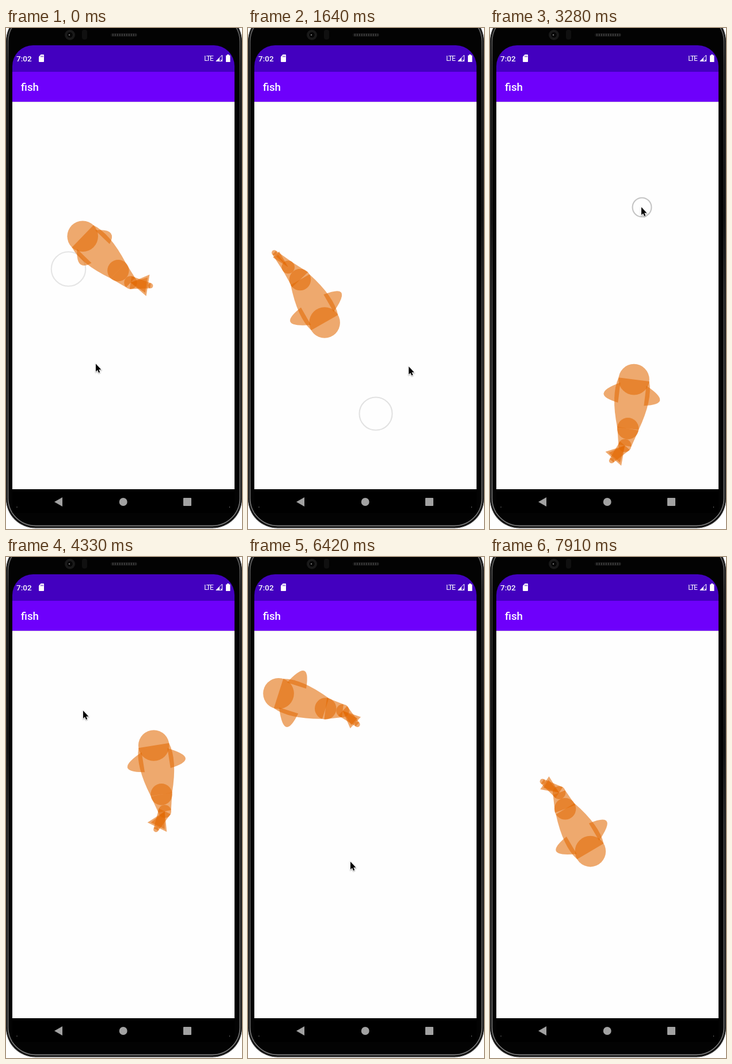
An HTML page with a canvas that plays this animation: 410x869 px, repeating every 8000 ms.

```html
<!DOCTYPE html>
<html lang="en">
<head>
<meta charset="utf-8">
<title>fish</title>
<style>
  html, body { margin: 0; width: 100%; height: 100%; overflow: hidden; background: #fff; }
  svg, canvas { position: absolute; left: 0; top: 0; width: 410px; height: 869px; display: block; }
  text { font-family: Roboto, sans-serif; fill: #fff; }
</style>
</head>
<body>
<svg viewBox="0 0 410 869">
  <defs>
    <linearGradient id="rim" x1="0" y1="0" x2="0" y2="1">
      <stop offset="0" stop-color="#777"/>
      <stop offset=".1" stop-color="#3c3c3c"/>
      <stop offset=".4" stop-color="#1c1c1c"/>
      <stop offset=".55" stop-color="#4a4a4a"/>
      <stop offset="1" stop-color="#777"/>
    </linearGradient>
  </defs>
  <!-- phone body -->
  <rect y="-28" width="410" height="895.5" rx="51" fill="#030303"/>
  <rect x=".7" y="-27.3" width="408.6" height="894" rx="50.5" fill="none" stroke="#444"/>
  <rect x="3.5" y="-24.5" width="403" height="888" rx="48" fill="none" stroke="url(#rim)" stroke-width="1.8"/>
  <circle cx="111" cy="12" r="9" fill="#191919"/>
  <circle cx="111" cy="12" r="5.5" fill="#070707" stroke="#222"/>
  <circle cx="110" cy="12" r="1.2" fill="#777"/>
  <rect x="132" y="3" width="9" height="17" rx="4" fill="#101010"/>
  <rect x="182" y="9" width="46" height="6" rx="3" fill="#141414"/>
  <path d="M185 12H226" stroke="#444" stroke-width="4" stroke-dasharray="1.5 2.5"/>
  <!-- screen -->
  <path d="M11 76V66A36 36 0 0 1 47 30H361A36 36 0 0 1 397 66V76Z" fill="#4300bf"/>
  <rect x="11" y="76" width="386" height="52" fill="#6e00fb"/>
  <rect x="11" y="128" width="386" height="672" fill="#fefefe"/>
  <path d="M11 128.4H397" stroke="#ddd" stroke-width=".8"/>
  <rect x="11" y="800" width="386" height="41" fill="#000"/>
  <text x="18" y="57.5" font-size="13.5" font-weight="500">7:02</text>
  <text x="344.3" y="57" font-size="12" letter-spacing="-1.1">LTE</text>
  <text x="26" y="109" font-size="18.7" font-weight="500">fish</text>
  <path d="M60.5 46H65Q66 46 66 47V58Q66 59 65 59H58Q57 59 57 58V50Z" fill="#fff"/>
  <path d="M60.7 48v2.5M62.5 48v2.5M64.3 48v2.5" stroke="#4300bf" stroke-width=".8"/>
  <path d="M365 57.5L375.5 47V57.5Z" fill="none" stroke="#fff"/>
  <path d="M364.5 58L371 51.5V58Z" fill="#fff"/>
  <path d="M372.5 54.5l3.5 3.5m0-3.5l-3.5 3.5" stroke="#fff"/>
  <path d="M384 46h3.5v1.5H389.5V59H382V47.5H384Z" fill="#fff"/>
  <g fill="#a2a2a2">
    <path d="M84 822L98 814V830Z"/>
    <circle cx="203.7" cy="822" r="7"/>
    <rect x="308" y="815" width="14" height="14" rx="1"/>
  </g>
  <path d="M18.5 831h1M388 831h1" stroke="#ccc"/>
</svg>
<canvas id="stage" width="410" height="869"></canvas>
<script>
const LOOP = 8000, FRAME = 149.25, SWIM = 2000, RIPPLE = 1000, FLAP = 500;
const HEAD = 26.8, BODY = HEAD * 3.2, FIN = HEAD * 1.3;
const BIG = HEAD * 0.7, MIDDLE = BIG * 0.6, SMALL = MIDDLE * 0.4;
const ORANGE = 'rgba(226,104,0,.57)';
const START = { x: 169, y: 412.5, angle: 90 };
const TOUCHES = [
  { t: -660, x: 108.5, y: 418, flaps: 2 },
  { t: 1002, x: 222, y: 669, flaps: 1 },
  { t: 2838, x: 264, y: 311, flaps: 1 },
  { t: 4690, x: 85, y: 248, flaps: 1 },
  { t: 6480, x: 178, y: 528, flaps: 1 }
];
// time, x, y of the pointer tip
const POINTER = [
  [0, 156, 582.5], [300, 170, 605], [890, 221, 671], [1340, 222, 672],
  [1790, 308, 545], [2240, 266, 420.5], [2690, 263, 312], [3580, 263, 310],
  [4330, 134, 266.5], [4480, 84, 260], [4630, 85, 248], [5300, 86, 250],
  [6270, 176, 526], [6420, 178, 528.5], [6720, 178, 528], [7300, 160, 585], [7600, 120, 585]
];

const ctx = document.getElementById('stage').getContext('2d');
const rad = deg => deg * Math.PI / 180;
const sin = deg => Math.sin(rad(deg));
const cos = deg => Math.cos(rad(deg));
const ease = k => (1 - Math.cos(Math.PI * k)) / 2;
const angleOf = (dx, dy) => Math.atan2(-dy, dx) * 180 / Math.PI;
const polar = (p, length, deg) => ({ x: p.x + cos(deg) * length, y: p.y - sin(deg) * length });

function cubic(p, u) {
  const v = 1 - u;
  const mix = k => v * v * v * p[0][k] + 3 * v * v * u * p[1][k] + 3 * v * u * u * p[2][k] + u * u * u * p[3][k];
  const slope = k => v * v * (p[1][k] - p[0][k]) + 2 * v * u * (p[2][k] - p[1][k]) + u * u * (p[3][k] - p[2][k]);
  return { x: mix('x'), y: mix('y'), angle: angleOf(slope('x'), slope('y')) };
}

function makeSwim(from, heading, to) {
  const turn = ((angleOf(to.x - from.x, to.y - from.y) - heading) % 360 + 540) % 360 - 180;
  const points = [from, polar(from, BODY / 2, heading), polar(from, HEAD * 1.6, heading + turn / 2), to];
  const lengths = [0], steps = 200;
  let last = from;
  for (let i = 1; i <= steps; i++) {
    const p = cubic(points, i / steps);
    lengths.push(lengths[i - 1] + Math.hypot(p.x - last.x, p.y - last.y));
    last = p;
  }
  return fraction => {
    const goal = fraction * lengths[steps];
    let i = 1;
    while (i < steps && lengths[i] < goal) i++;
    const part = (goal - lengths[i - 1]) / (lengths[i] - lengths[i - 1]);
    return cubic(points, (i - 1 + part) / steps);
  };
}

// Tail phase; it runs three times faster until the preceding swim is over.
function phaseAt(t, index) {
  const fast = index === 0 || t < TOUCHES[index - 1].t + SWIM;
  return (1230 + 0.362 * t) * (fast ? 3 : 1);
}

function poseAt(t, index) {
  const touch = TOUCHES[index], age = t - touch.t;
  const place = touch.swim(ease(Math.min(1, age / SWIM)));
  const phase = phaseAt(t, index);
  const flap = age < FLAP * touch.flaps ? ease(age % FLAP / FLAP) : 0;
  return { x: place.x, y: place.y, angle: place.angle + sin(phase * 0.8) * 10, phase, flap: 1 - Math.abs(2 * flap - 1) };
}

TOUCHES.forEach((touch, i) => {
  const from = i ? poseAt(touch.t, i - 1) : START;
  touch.swim = makeSwim(from, from.angle, touch);
});

function disc(p, r) {
  ctx.beginPath();
  ctx.arc(p.x, p.y, r, 0, Math.PI * 2);
  ctx.fill();
}

function polygon(...points) {
  ctx.beginPath();
  points.forEach(p => ctx.lineTo(p.x, p.y));
  ctx.closePath();
  ctx.fill();
}

function drawFin(head, angle, side, flap) {
  const root = polar(head, HEAD * 0.9, angle + side * 110);
  const end = polar(root, FIN, angle + 180);
  const reach = FIN * 1.8;
  const back = polar(root, reach * cos(65), angle + 180);
  const control = polar(back, reach * sin(65) * (1 - flap), angle + side * 90);
  ctx.beginPath();
  ctx.moveTo(root.x, root.y);
  ctx.quadraticCurveTo(control.x, control.y, end.x, end.y);
  ctx.fill();
}

function drawSegment(from, r1, r2, length, angle) {
  const to = polar(from, length, angle + 180);
  disc(to, r2);
  polygon(polar(to, r2, angle + 90), polar(to, r2, angle - 90), polar(from, r1, angle - 90), polar(from, r1, angle + 90));
  return to;
}

function drawTriangle(from, length, edge, angle) {
  const base = polar(from, length, angle + 180);
  polygon(from, polar(base, edge, angle + 90), polar(base, edge, angle - 90));
}

function drawBody(head, rear, angle) {
  const left = polar(head, HEAD, angle + 90), right = polar(head, HEAD, angle - 90);
  const rearLeft = polar(rear, BIG, angle + 90), rearRight = polar(rear, BIG, angle - 90);
  const bendLeft = polar(head, BODY * 0.56, angle + 130), bendRight = polar(head, BODY * 0.56, angle - 130);
  ctx.beginPath();
  ctx.moveTo(left.x, left.y);
  ctx.quadraticCurveTo(bendLeft.x, bendLeft.y, rearLeft.x, rearLeft.y);
  ctx.lineTo(rearRight.x, rearRight.y);
  ctx.quadraticCurveTo(bendRight.x, bendRight.y, right.x, right.y);
  ctx.fill();
}

function drawFish({ x, y, angle, phase, flap }) {
  ctx.fillStyle = ORANGE;
  const head = polar({ x, y }, BODY / 2, angle);
  const rear = polar(head, BODY, angle + 180);
  disc(head, HEAD);
  drawFin(head, angle, -1, flap);
  drawFin(head, angle, 1, flap);
  disc(rear, BIG);
  const joint = drawSegment(rear, BIG, MIDDLE, BIG * 1.6, angle + cos(phase) * 15);
  const tailAngle = angle + sin(phase) * 35;
  drawSegment(joint, MIDDLE, SMALL, MIDDLE * 3.1, tailAngle);
  const edge = Math.abs(sin(phase)) * BIG;
  drawTriangle(joint, MIDDLE * 2.7, edge, tailAngle);
  drawTriangle(joint, MIDDLE * 2.7 - HEAD * 0.1, edge - HEAD * 0.2, tailAngle);
  drawBody(head, rear, angle);
}

function drawRipple(touch, t) {
  const age = (t - touch.t) / RIPPLE;
  if (age < 0 || age >= 1) return;
  const k = ease(age);
  ctx.strokeStyle = `rgba(0,0,0,${0.392 * (1 - k)})`;
  ctx.lineWidth = 2.1;
  ctx.beginPath();
  ctx.arc(touch.x, touch.y, 40.2 * k, 0, Math.PI * 2);
  ctx.stroke();
}

function drawPointer(t) {
  const next = POINTER.findIndex(p => p[0] > t);
  if (next < 0) return;
  const a = POINTER[next - 1], b = POINTER[next], k = (t - a[0]) / (b[0] - a[0]);
  ctx.save();
  ctx.translate(a[1] + (b[1] - a[1]) * k, a[2] + (b[2] - a[2]) * k);
  const arrow = new Path2D('M0 0V13.5L3 10.8L5.1 15.5L7.2 14.5L5.2 10H9.4Z');
  ctx.shadowColor = 'rgba(0,0,0,.4)';
  ctx.shadowBlur = 2;
  ctx.shadowOffsetY = 1;
  ctx.strokeStyle = '#fff';
  ctx.lineWidth = 1.6;
  ctx.stroke(arrow);
  ctx.shadowColor = 'transparent';
  ctx.fillStyle = '#000';
  ctx.fill(arrow);
  ctx.restore();
}

const frameStart = n => Math.round(n * FRAME / 10) * 10;
function hold(t) {
  let n = Math.floor(t / FRAME) + 1;
  while (frameStart(n) > t) n--;
  return frameStart(n);
}

function render(time) {
  const t = hold(time % LOOP);
  const index = TOUCHES.filter(touch => touch.t <= t).length - 1;
  ctx.clearRect(0, 0, 410, 869);
  ctx.save();
  ctx.beginPath();
  ctx.rect(11, 128, 386, 672);
  ctx.clip();
  TOUCHES.forEach(touch => drawRipple(touch, t));
  drawFish(poseAt(t, index));
  ctx.restore();
  drawPointer(t);
}

const origin = performance.now();
function tick() {
  render(performance.now() - origin);
  requestAnimationFrame(tick);
}
tick();
</script>
</body>
</html>
```
